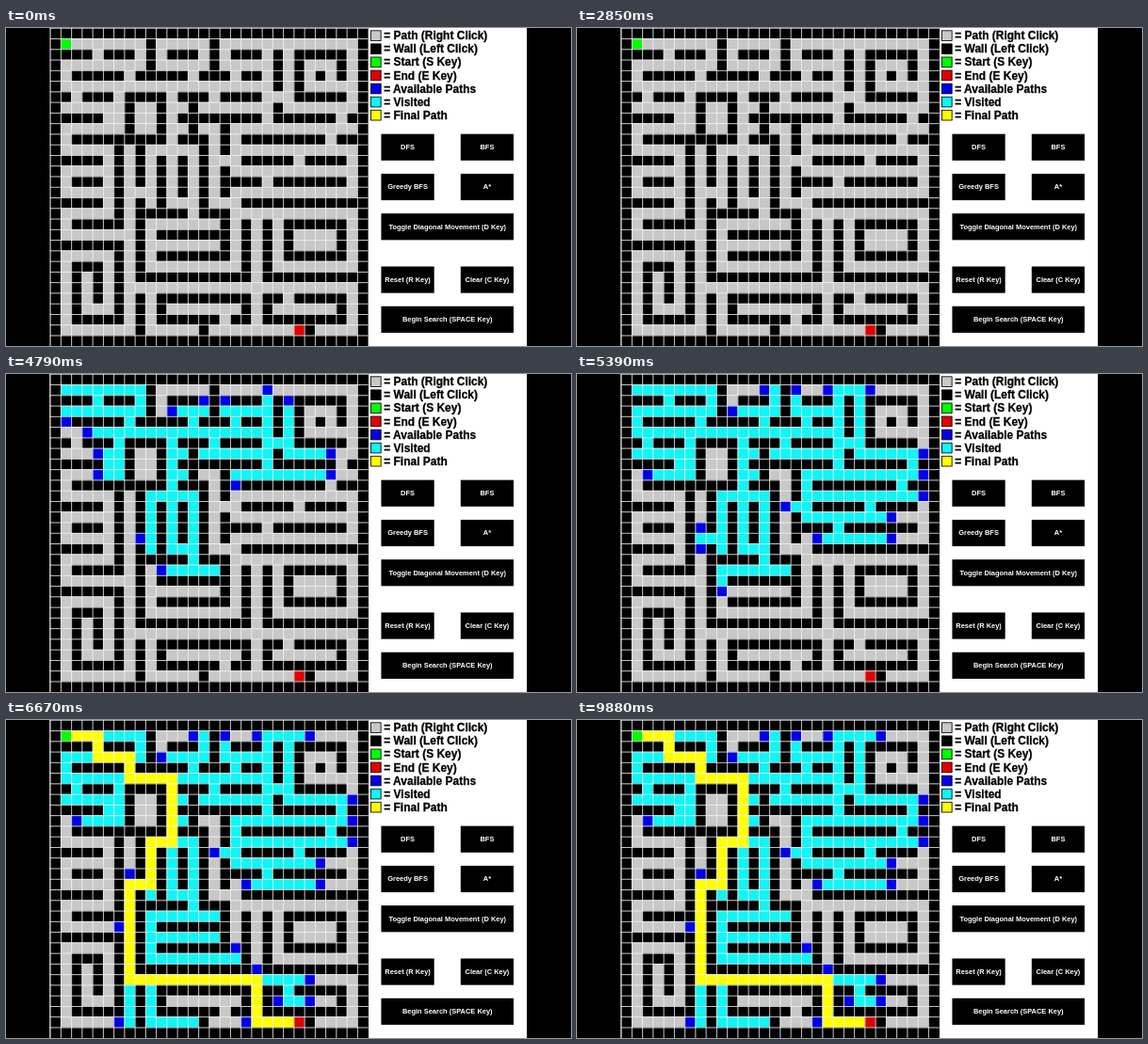
Recreate the animation shown at these times as an HTML page with a canvas. Size 600 by 338 pixels, loop 9.91 s.

```html
<!DOCTYPE html>
<html lang="en">
<head>
<meta charset="utf-8">
<title>Pathfinding visualizer</title>
<style>
  html, body { margin: 0; width: 600px; height: 338px; overflow: hidden; background: #000; }
  canvas, svg { position: absolute; left: 0; top: 0; }
  text { font-family: "Liberation Sans", Arial, sans-serif; font-weight: bold; }
  .key text { font-size: 21.3px; stroke: #000; stroke-width: .5; }
  .key rect { stroke: #000; stroke-width: 1.5; }
  .buttons text { font-size: 13.3px; fill: #fff; text-anchor: middle; }
</style>
</head>
<body>
<svg width="600" height="338">
  <g transform="translate(46.875) scale(.5625 .56333)">
    <rect width="900" height="600" fill="#fff"/>
    <g class="key" id="key"></g>
    <g class="buttons" id="buttons"></g>
  </g>
</svg>
<canvas id="grid" width="600" height="338"></canvas>
<script>
const LOOP = 9910, SEARCH_AT = 3615, STEP = 10;
// The app window is 900 x 600 units, scaled onto the stage
const N = 30, CELL = 20, SIZE = N * CELL;
const COLOR = {
  path: '#c8c8c8', wall: '#000', start: '#0f0', end: '#e00000',
  open: '#0000e6', visited: '#10f5f5', final: '#ff0'
};

const MAZE = [
  '##############################',
  '#........#.....#.............#',
  '####.###.#.###.#.###.#.#####.#',
  '#........#.....#.....#.#...#.#',
  '#.#####.#####.###.##.#.#.#.#.#',
  '#....................#.#.....#',
  '##.###.####.###.####...#####.#',
  '#......#..#..#.......#.......#',
  '#####..#..#.########.######.##',
  '#......#..#..#..#............#',
  '#.#########.###.#.########.###',
  '#.....#.#.....#.#............#',
  '#####.#.#.#.#.#...#####.####.#',
  '#.....#.#.#.#.#.#............#',
  '#.###.#.#.#.#.#.####.#######.#',
  '#.....#...#.#.#.#............#',
  '#####.#.#.#...#...############',
  '#.....#.#####.###............#',
  '#.#####.#.......#.#.#.######.#',
  '#.......#.#######.#.#.#....#.#',
  '#######.#.......#.#.#.#....#.#',
  '#.....#.#.#######.#.#.######.#',
  '#.###.#.#.........#.#........#',
  '#.#.#.#.###########.##########',
  '#.#.#.#......................#',
  '#.#.#.#.#.#########.##.#####.#',
  '#.#...#.#.#.......#.#......#.#',
  '#.#####.#.######.##.########.#',
  '#.......#.....#.........#....#',
  '##############################'
].join('');
const START = N + 1, END = 28 * N + 23;

// A* with Manhattan distance; equal scores are taken first in, first out
function search() {
  const dist = i => Math.abs(i % N - END % N) + Math.abs((i / N | 0) - (END / N | 0));
  const cost = { [START]: 0 }, from = {}, openAt = {}, visitAt = {};
  const queue = [START];
  const score = i => cost[i] + dist(i);
  let steps = 0;
  while (queue.length) {
    let best = 0;
    queue.forEach((i, k) => {
      if (score(i) < score(queue[best])) best = k;
    });
    const cell = queue.splice(best, 1)[0];
    if (cell === END) break;
    visitAt[cell] = ++steps;
    for (const d of [N, -N, 1, -1]) {
      const next = cell + d;
      if (MAZE[next] === '#' || cost[next] <= cost[cell] + 1) continue;
      cost[next] = cost[cell] + 1;
      from[next] = cell;
      if (queue.includes(next)) continue;
      openAt[next] = steps;
      queue.push(next);
    }
  }
  const finalAt = {};
  for (let i = from[END], k = steps; i !== undefined; i = from[i]) finalAt[i] = ++k;
  return { openAt, visitAt, finalAt };
}

const { openAt, visitAt, finalAt } = search();

function stateOf(i, n) {
  if (i === END) return 'end';
  if (MAZE[i] === '#') return 'wall';
  if (finalAt[i] <= n) return i === START ? 'start' : 'final';
  if (visitAt[i] <= n) return 'visited';
  if (i === START) return 'start';
  return openAt[i] <= n ? 'open' : 'path';
}

const ctx = document.getElementById('grid').getContext('2d');
ctx.setTransform(.5625, 0, 0, .56333, 46.875, 0);

function draw(t) {
  const n = Math.floor((t - SEARCH_AT) / STEP);
  for (let i = 0; i < N * N; i++) {
    ctx.fillStyle = COLOR[stateOf(i, n)];
    ctx.fillRect(i % N * CELL, (i / N | 0) * CELL, CELL, CELL);
  }
  ctx.strokeStyle = '#f4f4f4';
  ctx.lineWidth = 1.4;
  ctx.beginPath();
  for (let k = 0; k < N; k++) {
    const p = k * CELL + .5;
    ctx.moveTo(p, 0);
    ctx.lineTo(p, SIZE);
    ctx.moveTo(0, p);
    ctx.lineTo(SIZE, p);
  }
  ctx.stroke();
}

const KEY = [
  ['path', 'Path (Right Click)'], ['wall', 'Wall (Left Click)'], ['start', 'Start (S Key)'],
  ['end', 'End (E Key)'], ['open', 'Available Paths'], ['visited', 'Visited'], ['final', 'Final Path']
];
document.getElementById('key').innerHTML = KEY.map(([name, label], k) =>
  `<rect x="605.5" y="${5 + 25 * k}" width="19" height="19" fill="${COLOR[name]}"/>
   <text x="630" y="${21.8 + 25 * k}">= ${label}</text>`).join('');

const BUTTONS = [
  [625, 200, 100, 'DFS'], [775, 200, 100, 'BFS'],
  [625, 275, 100, 'Greedy BFS'], [775, 275, 100, 'A*'],
  [625, 350, 250, 'Toggle Diagonal Movement (D Key)'],
  [625, 450, 100, 'Reset (R Key)'], [775, 450, 100, 'Clear (C Key)'],
  [625, 525, 250, 'Begin Search (SPACE Key)']
];
document.getElementById('buttons').innerHTML = BUTTONS.map(([x, y, w, label]) =>
  `<rect x="${x}" y="${y}" width="${w}" height="50"/>
   <text x="${x + w / 2}" y="${y + 29}">${label}</text>`).join('');

const t0 = performance.now();
function tick() {
  draw((performance.now() - t0) % LOOP);
  requestAnimationFrame(tick);
}
tick();
</script>
</body>
</html>
```
